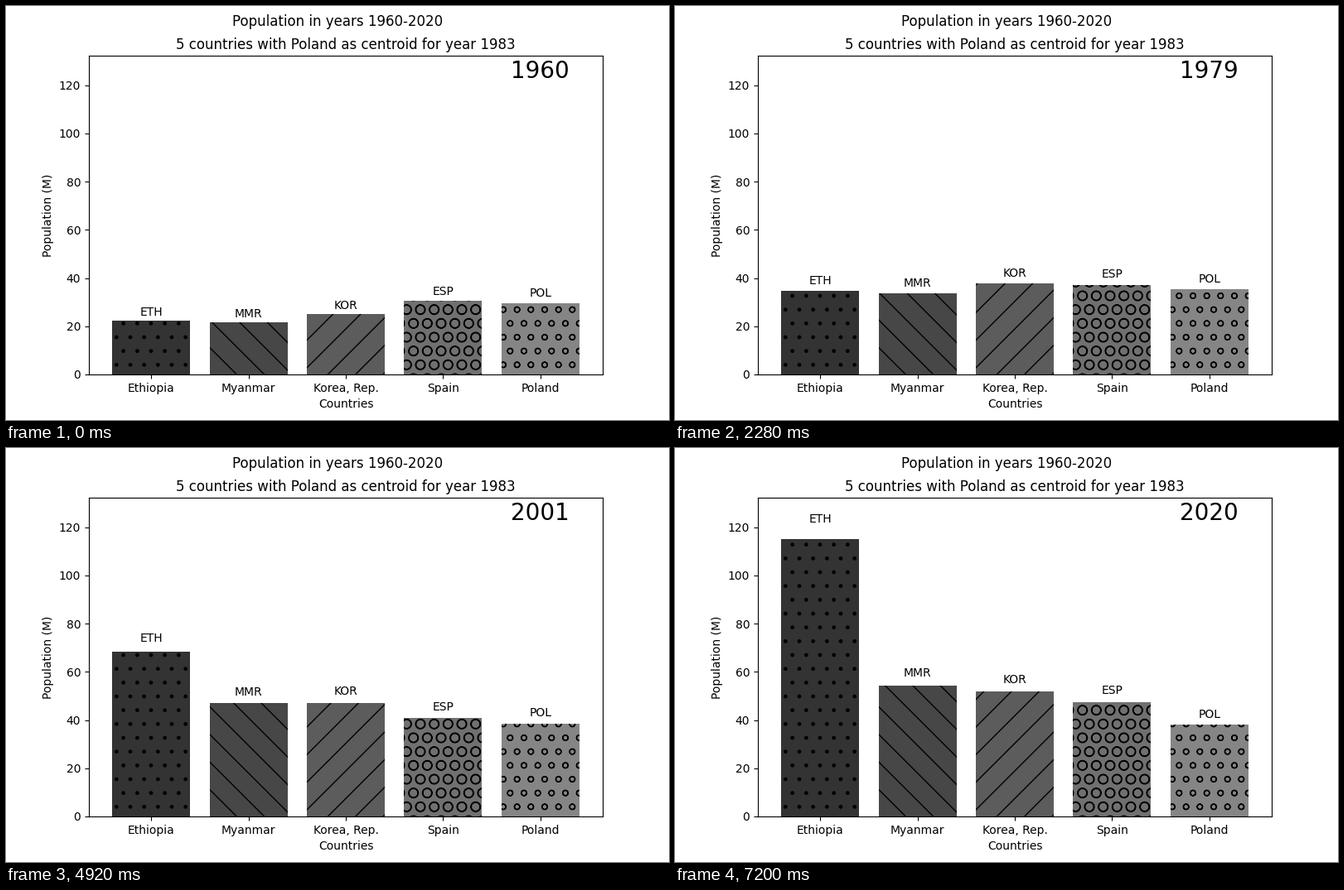
A matplotlib script for the animation above (7320 ms loop, 800 by 500 pixels).

```python
import matplotlib.pyplot as plt
import numpy as np
from matplotlib.animation import FuncAnimation

FIRST, LAST = 1960, 2020
YEARS = LAST - FIRST + 1
TOP = 132.2

# name, code, hatch, key populations in millions, evenly spread over the years
COUNTRIES = [
    ("Ethiopia", "ETH", ".", [22.15, 30.14, 39.4, 58.88, 82.92, 114.96]),
    ("Myanmar", "MMR", "\\", [21.74, 28.5, 37.5, 44.45, 49.93, 54.41]),
    ("Korea, Rep.", "KOR", "/", [25.01, 33.51, 40.41, 45.52, 49.05, 51.78]),
    ("Spain", "ESP", "O", [30.46, 32.35, 34.5, 36.91, 38.28, 38.87,
                           39.89, 41.43, 45.95, 46.48, 47.35]),
    ("Poland", "POL", "o", [29.64, 33.06, 36.91, 38.62, 38.13, 37.95]),
]


def yearly(keys):
    """Fill in every year with a cubic Hermite curve through the key points."""
    p = np.array(keys)
    m = np.gradient(p, edge_order=2)
    u = np.linspace(0, len(p) - 1, YEARS)
    i = np.minimum(u.astype(int), len(p) - 2)
    t = u - i
    return ((1 + 2 * t) * (1 - t) ** 2 * p[i] + t * (1 - t) ** 2 * m[i]
            + t ** 2 * (3 - 2 * t) * p[i + 1] + t ** 2 * (t - 1) * m[i + 1])


names, codes, hatches, keys = zip(*COUNTRIES)
population = np.array([yearly(k) for k in keys])
greys = [str(0.2 + 0.08 * n) for n in range(len(names))]

fig, ax = plt.subplots(figsize=(8, 5), dpi=100)
fig.suptitle("Population in years 1960-2020")
ax.set_title("5 countries with Poland as centroid for year 1983")
ax.set_xlabel("Countries")
ax.set_ylabel("Population (M)")

bars = ax.bar(names, population[:, 0], color=greys, hatch=hatches)
labels = [ax.text(x, 0, code, ha="center", va="bottom") for x, code in enumerate(codes)]
year_text = ax.text(4, 123, "", ha="center", fontsize=20)
ax.set_xlim(-0.64, 4.64)
ax.set_ylim(0, TOP)


def update(frame):
    for bar, label, value in zip(bars, labels, population[:, frame]):
        bar.set_height(value)
        label.set_y(value * 1.05)
    year_text.set_text(str(FIRST + frame))
    return [*bars, *labels, year_text]


anim = FuncAnimation(fig, update, frames=YEARS, interval=120,
                     repeat=True, repeat_delay=0, blit=False)
plt.show()
```
